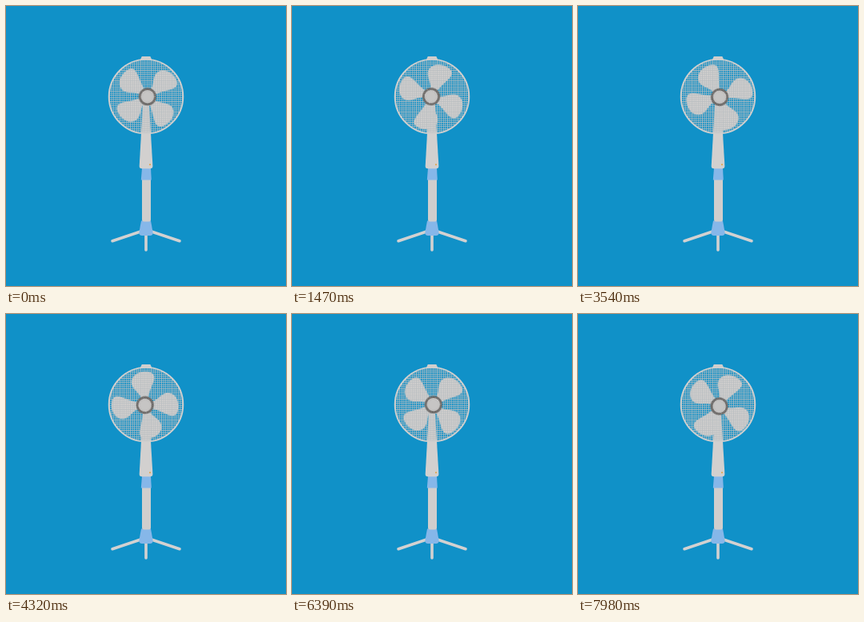
Recreate the animation shown at these times as an HTML page. Size 350x350 px, loop 8000 ms.

```html
<!DOCTYPE html>
<html lang="en">
<head>
<meta charset="utf-8">
<title>Pedestal fan</title>
<style>
  html, body { margin: 0; width: 100%; height: 100%; overflow: hidden; background: #1091c8; }
  svg { display: block; width: 100vw; height: 100vh; }

  /* 49 degrees every 30 ms; the last pose is held for 20 ms */
  .rotor { animation: spin 8000ms -1ms infinite; }
  @keyframes spin {
    0% { transform: rotate(0deg); animation-timing-function: steps(266, end); }
    99.75%, 100% { transform: rotate(13034deg); }
  }
</style>
</head>
<body>
<svg viewBox="0 0 350 350">
  <defs>
    <pattern id="mesh" width="2.6" height="2.6" patternUnits="userSpaceOnUse" patternTransform="translate(175 113)">
      <path d="M0 1.3H2.6M1.3 0V2.6" stroke="#b8bdc0" stroke-width=".7"/>
    </pattern>
    <path id="blade" d="M-4-8C-6-16-13.5-19-15.3-27C-16.3-36-8-41.5 0-41.8C7-42 13-40 13.3-35C13.6-28 7-21 4-8Z"/>
  </defs>

  <rect width="350" height="350" fill="#1091c8"/>

  <!-- stand -->
  <path d="M168 282L133 293.7M182 282L217 293.7M175 287V305" fill="none" stroke="#d2d1d1" stroke-width="3.6" stroke-linecap="round"/>
  <path d="M169 268.5H181L183.6 283Q183.8 287 180 287H170Q166.2 287 166.4 283Z" fill="#86b7e9"/>
  <path d="M170 216H181V267Q181 269.5 178.5 269.5H172.5Q170 269.5 170 267Z" fill="#d0cecd"/>
  <path d="M170 203H181L181.8 217.5H168.8Z" fill="#86b7e9"/>

  <!-- neck -->
  <path d="M171.3 118H178.6L183.4 200Q183.4 203.3 180 203.3H170Q166.6 203.3 166.7 200Z" fill="#d2d0cf"/>
  <circle cx="180" cy="198.2" r="1" fill="#e2a33f"/>
  <path d="M167.7 67.5L169.8 63H180.4L182.4 67.5Z" fill="#d0cecd"/>

  <!-- blades, mounted slightly off the axis and unevenly spaced -->
  <g transform="translate(175.4 114.1)">
    <g class="rotor">
      <g transform="translate(1.5 -.8) rotate(50)" fill="#d2d0cf">
        <use href="#blade"/>
        <use href="#blade" transform="rotate(91)"/>
        <use href="#blade" transform="rotate(184)"/>
        <use href="#blade" transform="rotate(263)"/>
      </g>
    </g>
  </g>

  <!-- cage -->
  <circle cx="175" cy="113.2" r="46" fill="url(#mesh)"/>
  <circle cx="175" cy="113.2" r="46.3" fill="none" stroke="#d0cfce" stroke-width="1.9"/>

  <!-- hub -->
  <g transform="translate(175.4 114.1)">
    <g class="rotor">
      <g transform="translate(1.5 -.8)">
        <circle r="11" fill="#5f5c5a"/>
        <circle r="9.7" fill="none" stroke="#8f8c8a" stroke-width="1.6" stroke-dasharray="1 1.2"/>
        <circle r="8.3" fill="#cfcdcc"/>
        <circle r="6.6" fill="none" stroke="#b4b3b2" stroke-width=".8"/>
        <circle r="6" fill="#c6c5c4"/>
      </g>
    </g>
  </g>
</svg>
</body>
</html>
```
